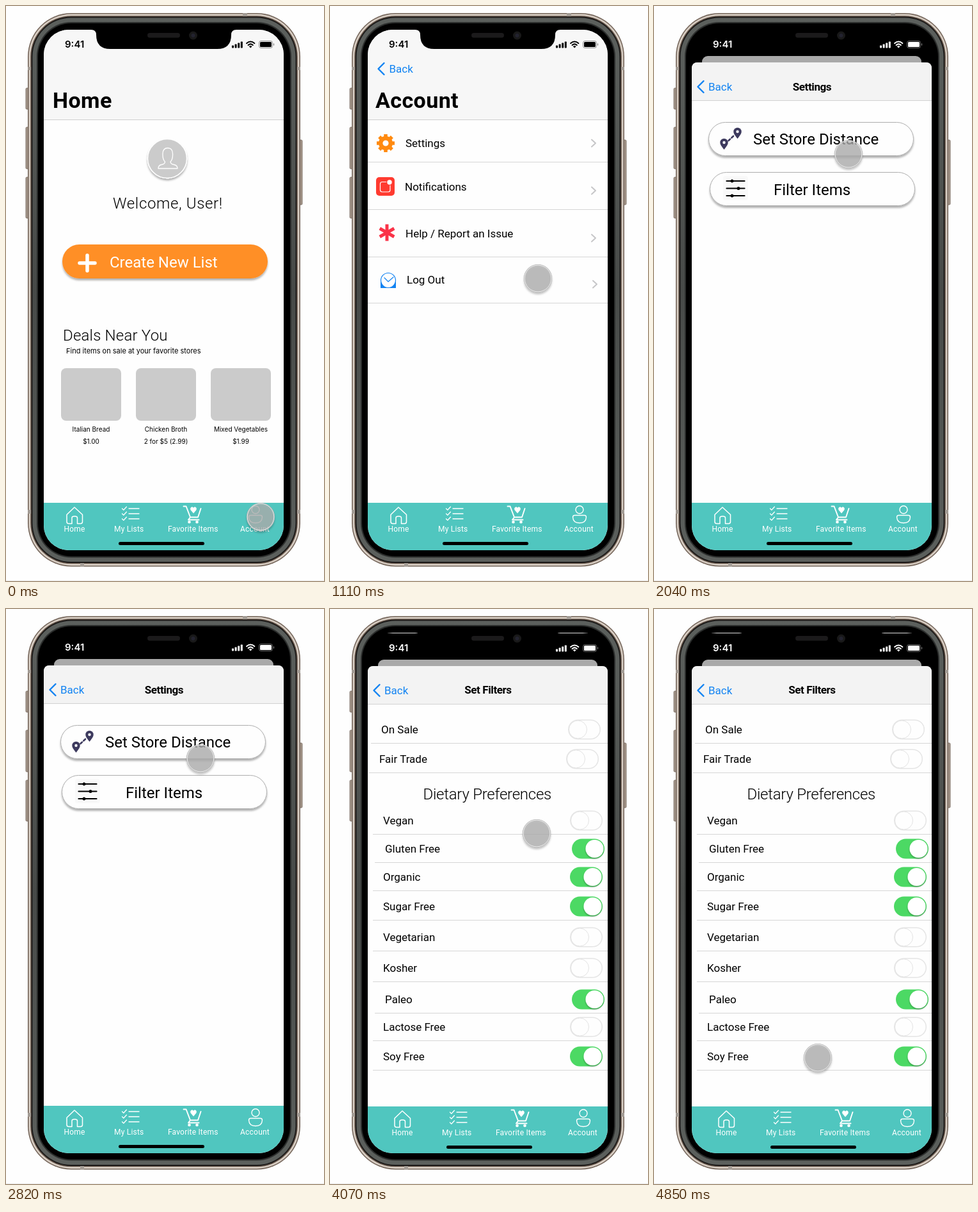
An HTML page that plays this animation: 497 px wide and 897 px high, repeating every 5000 ms.

```html
<!DOCTYPE html>
<html lang="en">
<head>
<meta charset="utf-8">
<title>Grocery app</title>
<style>
html, body { margin: 0; width: 100%; height: 100%; overflow: hidden; background: #fefefe; }
svg { display: block; width: 497px; height: 897px; }
text { font-family: Roboto, sans-serif; white-space: pre; }
.inter { font-family: Inter, sans-serif; }
.line { fill: none; stroke-linecap: round; stroke-linejoin: round; }
</style>
</head>
<body>
<svg id="stage" viewBox="0 0 497 897" xmlns="http://www.w3.org/2000/svg"></svg>
<script>
const LOOP = 5000;
const TEAL = '#50c6bf', BLUE = '#1283f2', NAVY = '#3d3a5e';

// Drawing helpers
const attrs = o => Object.entries(o).map(([k, v]) => `${k}="${v}"`).join(' ');
const text = (x, y, s, size, o = {}) => `<text x="${x}" y="${y}" font-size="${size}" ${attrs(o)}>${s}</text>`;
const rect = (x, y, w, h, r, fill, o = {}) =>
  `<rect x="${x}" y="${y}" width="${w}" height="${h}" rx="${r}" fill="${fill}" ${attrs(o)}/>`;
const circle = (x, y, r, fill, o = {}) => `<circle cx="${x}" cy="${y}" r="${r}" fill="${fill}" ${attrs(o)}/>`;
const line = (d, color, w = 1.4, o = {}) =>
  `<path class="line" d="${d}" stroke="${color}" stroke-width="${w}" ${attrs(o)}/>`;
const rule = (x, y, color = '#d6d6d6') => rect(x, y, 434 - x, 1, 0, color);
const group = (x, y, body) => `<g transform="translate(${x} ${y})">${body}</g>`;
const mid = { 'text-anchor': 'middle' };
const thin = { 'font-weight': 300 };
const shadow = { filter: 'url(#drop)' };

const statusBar = c => text(92, 65, '9:41', 15, { class: 'inter', 'font-weight': 600, fill: c }) +
  [4, 6, 8, 10].map((h, i) => rect(353 + i * 4.6, 65.5 - h, 3, h, .8, c)).join('') +
  line('M376 58.2Q382.2 52.8 388.4 58.2M378.6 61Q382.2 57.8 385.8 61', c, 2, { 'stroke-linecap': 'butt' }) +
  `<path d="M382.2 65.6L379.8 63Q382.2 61 384.6 63Z" fill="${c}"/>` +
  rect(395.5, 54.5, 21, 11, 3, 'none', { stroke: c, 'stroke-opacity': .4 }) +
  rect(397, 56, 18, 8, 1.6, c) + rect(417.8, 58.2, 1.4, 3.6, .7, c, { opacity: .4 });

const tabBar = () => {
  const label = (x, s) => text(x, 820, s, 12, { ...mid, fill: '#fff', 'letter-spacing': .2 });
  const checks = [784, 792, 800].map(y =>
    line(`M181.5 ${y}l2.3 2.3l4.6 -5M192 ${y}h16`, '#fff', 1.3)).join('');
  return line('M95 793.5L107 782L119.5 793.5V804.5Q119.5 807.5 116.5 807.5H111.5V798.5Q111.5 796 107.2 796Q103 796 103 798.5V807.5H98Q95 807.5 95 804.5Z', '#fff', 1.5) +
    checks +
    line('M277.5 780.5H281.5L288 797.5H300L304.5 784M288 797.5L285 801.5H301.5', '#fff', 1.9) +
    `<path d="M293 791.5L288.8 786.5C286.5 783 291 779.5 293 783C295 779.5 299.5 783 297.2 786.5Z" fill="#fff"/>` +
    circle(286.5, 805, 2.3, '#fff') + circle(298.5, 805, 2.3, '#fff') +
    circle(390, 785.8, 6, 'none', { stroke: '#fff', 'stroke-width': 1.4 }) +
    line('M382.5 794.5H397.5Q400.5 794.5 400.5 797.5Q400 806.5 390 806.5Q380 806.5 379.5 797.5Q379.5 794.5 382.5 794.5Z', '#fff', 1.4) +
    label(107, 'Home') + label(192.3, 'My Lists') + label(292.3, 'Favorite Items') + label(389, 'Account') +
    rect(176, 836, 134, 5, 2.5, '#000');
};

const back = (x, y) => line(`M${x + 10.5} ${y - 9}L${x + 1.5} ${y}L${x + 10.5} ${y + 9}`, BLUE, 2.4) +
  text(x + 18, y + 6, 'Back', 17, { fill: BLUE });

const fullPage = (title, x, body) => rect(59, 37, 375, 813, 0, '#fefefe') +
  rect(59, 37, 375, 140, 0, '#f7f7f7') + rule(59, 177, '#cfcfcf') +
  text(x, 159, title, 34, { 'font-weight': 700, 'letter-spacing': .4 }) +
  statusBar('#000') + body + rect(59, 775, 375, 75, 0, TEAL) + tabBar();

const sheetPage = (title, dx, dy, body) => rect(59, 37, 375, 813, 0, '#000') +
  group(0, dy, rect(75, 78, 343, 30, 9, '#a9a9a9') + rect(59, 88, 375, 780, 9, '#fefefe') +
    '<path d="M59 148V97Q59 88 68 88H425Q434 88 434 97V148Z" fill="#f3f3f3"/>' +
    rule(59, 147, '#d2d2d2') + statusBar('#fff') + back(67, 126)) +
  text(247, 131.5, title, 17, { ...mid, 'font-weight': 700, 'letter-spacing': -.4 }) +
  body + rect(59, 775 + dy, 375, 76, 0, TEAL) + group(dx, dy, tabBar());

// Home
const deals = [['Italian Bread', '$1.00'], ['Chicken Broth', '2 for $5 (2.99)'], ['Mixed Vegetables', '$1.99']];
const small = { ...mid, class: 'inter' };
const home = fullPage('Home', 73,
  circle(252, 238, 30.5, '#cbcbcb', { stroke: '#fff', 'stroke-width': 1.5, ...shadow }) +
  line('M238 253.5Q238 248.5 243 247.5Q248.5 246.5 248.5 243Q244.5 239 245 230Q245.5 221.5 252.8 221.5Q260 221.5 260.5 230Q261 239 257 243Q257 246.5 262.5 247.5Q268 248.5 268 253.5Z', '#fff', 1.3) +
  text(167, 316, 'Welcome, User!', 24, { ...thin, 'letter-spacing': .65 }) +
  rect(88, 372, 321, 53, 26.5, '#ff8f28', shadow) +
  line('M127 389V413M115 401H139', '#fff', 5.5) +
  text(162, 408, 'Create New List', 24, { fill: '#fff' }) +
  text(89, 522, 'Deals Near You', 24, { ...thin, 'letter-spacing': .2 }) +
  text(94, 542, 'Find items on sale at your favorite stores', 11, { class: 'inter' }) +
  deals.map(([name, price], i) => rect(86 + i * 117, 565, 94, 82, 8, '#cbcbcb') +
    text(133 + i * 117, 664, name, 10, small) + text(133 + i * 117, 683, price, 10, small)).join(''));

// Account
const chevron = (x, y) => line(`M${x - 3} ${y - 5.5}L${x + 3} ${y}L${x - 3} ${y + 5.5}`, '#c6c6c8', 2);
const spokes = (n, d, color, w) => Array.from({ length: n }, (_, i) =>
  `<path d="${d}" stroke="${color}" stroke-width="${w}" transform="rotate(${i * 360 / n})"/>`).join('');
const rows = [['Settings', 118, 220, 412, 214, 243], ['Notifications', 117, 288, 412, 288, 317],
  ['Help / Report an Issue', 118, 361, 412, 362, 391], ['Log Out', 120, 433, 414, 434, 463]];
const account = fullPage('Account', 71, back(74, 98).replace('x="92"', 'x="92.5"') +
  rows.map(([s, x, y, cx, cy, ly]) => text(x, y, s, 17) + chevron(cx, cy) + rule(59, ly)).join('') +
  group(87, 214, spokes(8, 'M0 -9V-14', '#ff8a0f', 5.6) +
    circle(0, 0, 7.8, 'none', { stroke: '#ff8a0f', 'stroke-width': 6.4 })) +
  rect(72, 267, 29, 29, 5, '#ff3b30') +
  rect(78.5, 274.5, 15.5, 15.5, 3, 'none', { stroke: '#fff', 'stroke-width': 1.2 }) +
  circle(93, 275, 5, '#ff3b30') + circle(93, 275, 3.7, '#fff') +
  group(89, 353.5, spokes(6, 'M0 0V-13', '#fa3348', 5)) +
  `<path d="M79 428V440H103V428Z" fill="${BLUE}"/>` +
  circle(91, 428, 11.5, '#fefefe', { stroke: BLUE, 'stroke-width': 1.2 }) +
  line('M85 424L91 430L99 423', BLUE, 1.2));

// Settings
const pin = (x, y) => group(x, y, `<path d="M0 9C-4 4 -6.2 1 -6.2 -2A6.2 6.2 0 0 1 6.2 -2C6.2 1 4 4 0 9Z" fill="${NAVY}"/>` +
  circle(0, -2, 2.2, '#fff'));
const pill = (x, y) => rect(x, y, 320, 52, 26, '#fefefe', { stroke: '#acacac', ...shadow });
const settings = sheetPage('Settings', 0, 0,
  pill(85.5, 181.5) + pin(130.5, 198) + pin(109.5, 215) +
  line('M116.5 210L119 207.6M121.3 205.5L124 203', NAVY, 2.6) +
  text(155, 216, 'Set Store Distance', 24) +
  pill(87.5, 259.5) + rect(108, 265, 39, 38, 4, '#f9f9f9') +
  [[273, 122], [284.5, 132], [296, 122]].map(([y, x]) =>
    line(`M113.5 ${y}H141.5`, '#000', 2.2) + circle(x, y, 2.5, '#000')).join('') +
  text(187, 295, 'Filter Items', 24));

// Filters
const toggle = (x, y, on) => on
  ? rect(x, y, 51, 31, 15.5, '#4cd964') + circle(x + 35.5, y + 15.5, 14, '#fff', { filter: 'url(#knob)' })
  : rect(x + .75, y + .75, 49.5, 29.5, 14.75, '#fefefe', { stroke: '#e5e5e5', 'stroke-width': 1.5 }) +
    circle(x + 15.5, y + 15.5, 14, '#fefefe', { stroke: '#e3e3e3' });
const options = [['On Sale', 80, 194], ['Fair Trade', 77, 240], ['Vegan', 83, 336], ['Gluten Free', 86, 380, 1],
  ['Organic', 83, 424, 1], ['Sugar Free', 83, 470, 1], ['Vegetarian', 83, 518], ['Kosher', 83, 566],
  ['Paleo', 86, 615, 1], ['Lactose Free', 83, 658], ['Soy Free', 83, 704, 1]];
const filters = sheetPage('Set Filters', 6, 1,
  rect(78, 37, 62, 1, 0, '#ddd') + rect(353, 37, 67, 1, 0, '#ddd') +
  text(145.5, 297, 'Dietary Preferences', 24, { ...thin, 'letter-spacing': -.25 }) +
  options.map(([s, x, y, on]) => text(x, y, s, 17) + toggle(x + 292, y - 21.5, on) + rule(x - 16, y + 15)).join(''));

// Phone body
const shell = [[0, '#75665b'], [1.6, '#d8cec4'], [4.2, '#6b5a4e'], [5.6, '#1c1a19'], [7.5, 'url(#steel)'], [14, '#2c2e2d'], [16, '#000']]
  .map(([d, c]) => rect(34 + d, 11 + d, 426 - 2 * d, 863.5 - 2 * d, 68 - d, c)).join('');
const buttons = [[31, 128, 33], [31, 189, 65], [31, 267, 64], [458.5, 209, 101]].map(([x, y, h]) =>
  rect(x, y, 4.5, h, 1.5, '#a4968a', { stroke: '#6f6156', 'stroke-width': .8 })).join('');
const bands = [[370, 11, 7, 5], [116, 869, 6, 5], [34, 95, 5, 5], [455, 95, 5, 5], [34, 786, 5, 6], [455, 786, 5, 6]]
  .map(([x, y, w, h]) => rect(x, y, w, h, 0, '#a39c95')).join('');
const notch = '<path d="M133 36V37Q141 37 141 45Q141 67 163 67H330Q352 67 352 45Q352 37 360 37V36Z"/>' +
  rect(221, 42, 51, 7.5, 3.75, '#1b1a1b') + circle(292.5, 46, 6.5, '#191919') + circle(292.5, 46, 3, '#23232f');

const pages = { home, account, settings, filters };
const dropShadow = (id, dy, blur, alpha) => `<filter id="${id}" x="-30%" y="-30%" width="160%" height="170%">
  <feDropShadow dx="0" dy="${dy}" stdDeviation="${blur}" flood-opacity="${alpha}"/></filter>`;
const stage = document.getElementById('stage');
stage.innerHTML = `<defs>${dropShadow('drop', 3, 1.5, .3)}${dropShadow('knob', 1.5, 1, .35)}
  <linearGradient id="steel" x2="0" y2="1"><stop stop-color="#5c605d"/><stop offset=".5" stop-color="#474a48"/><stop offset="1" stop-color="#5c605d"/></linearGradient>
  <clipPath id="screen">${rect(59, 37, 375, 812, 39, '#000')}</clipPath></defs>
  ${rect(0, 896, 497, 1, 0, '#ececec')}${buttons}${shell}${bands}
  <g clip-path="url(#screen)">${Object.entries(pages).map(([id, body]) => `<g id="${id}">${body}</g>`).join('')}</g>${notch}
  <g id="cursor"><g id="idle">
    ${circle(0, 0, 22, 'rgba(175,175,175,.75)', { filter: 'url(#drop)' })}
    ${circle(0, 0, 21.6, 'none', { stroke: '#b4b4b4', 'stroke-width': .8 })}
    ${circle(0, 0, 20.8, 'none', { stroke: '#fff', 'stroke-width': .9, opacity: .8 })}</g>
    <g id="press">${circle(0, 0, 20.2, 'none', { stroke: '#bdbdbd', 'stroke-width': 3 })}
    ${circle(0, 0, 19, 'rgba(213,213,60,.82)')}</g></g>`;

// Timelines: each entry holds until the next one
const path = [[0, 398, 797], [860, 401, 782], [940, 406, 734], [1020, 370, 570], [1110, 325, 425], [1190, 311, 345],
  [1260, 306, 304], [1340, 305, 290], [1420, 311, 266], [1490, 306, 240], [1570, 304, 231],
  [2820, 304, 233], [2900, 304, 245], [2980, 304, 265], [3050, 304, 281], [3130, 304, 286],
  [3900, 307, 295], [3980, 315, 318], [4070, 323, 350], [4140, 325, 391],
  [4290, 324, 400], [4360, 317, 430], [4430, 304, 490], [4500, 286, 568], [4560, 269, 640], [4620, 259, 685],
  [4690, 256, 699], [4850, 256, 700]];
const views = [[0, 'home'], [230, 'home', 'account'], [310, 'account'], [1970, 'account', 'settings'],
  [2040, 'settings'], [3440, 'filters']];
const presses = [[0, 0], [150, 1], [310, 0], [1800, 1], [2040, 0], [3360, 1], [3440, 0]];

const at = (steps, t) => steps.findLast(s => s[0] <= t);
const el = id => document.getElementById(id);
const show = (id, opacity) => {
  el(id).style.display = opacity ? '' : 'none';
  el(id).style.opacity = opacity;
};

function render(t) {
  const [, x, y] = at(path, t);
  const [, base, next] = at(views, t);
  const pressed = at(presses, t)[1];
  for (const id in pages) show(id, id === base ? 1 : id === next ? .5 : 0);
  el('cursor').setAttribute('transform', `translate(${x} ${y})`);
  show('idle', 1 - pressed);
  show('press', pressed);
}

function tick() {
  render(performance.now() % LOOP);
  requestAnimationFrame(tick);
}
tick();
</script>
</body>
</html>
```
